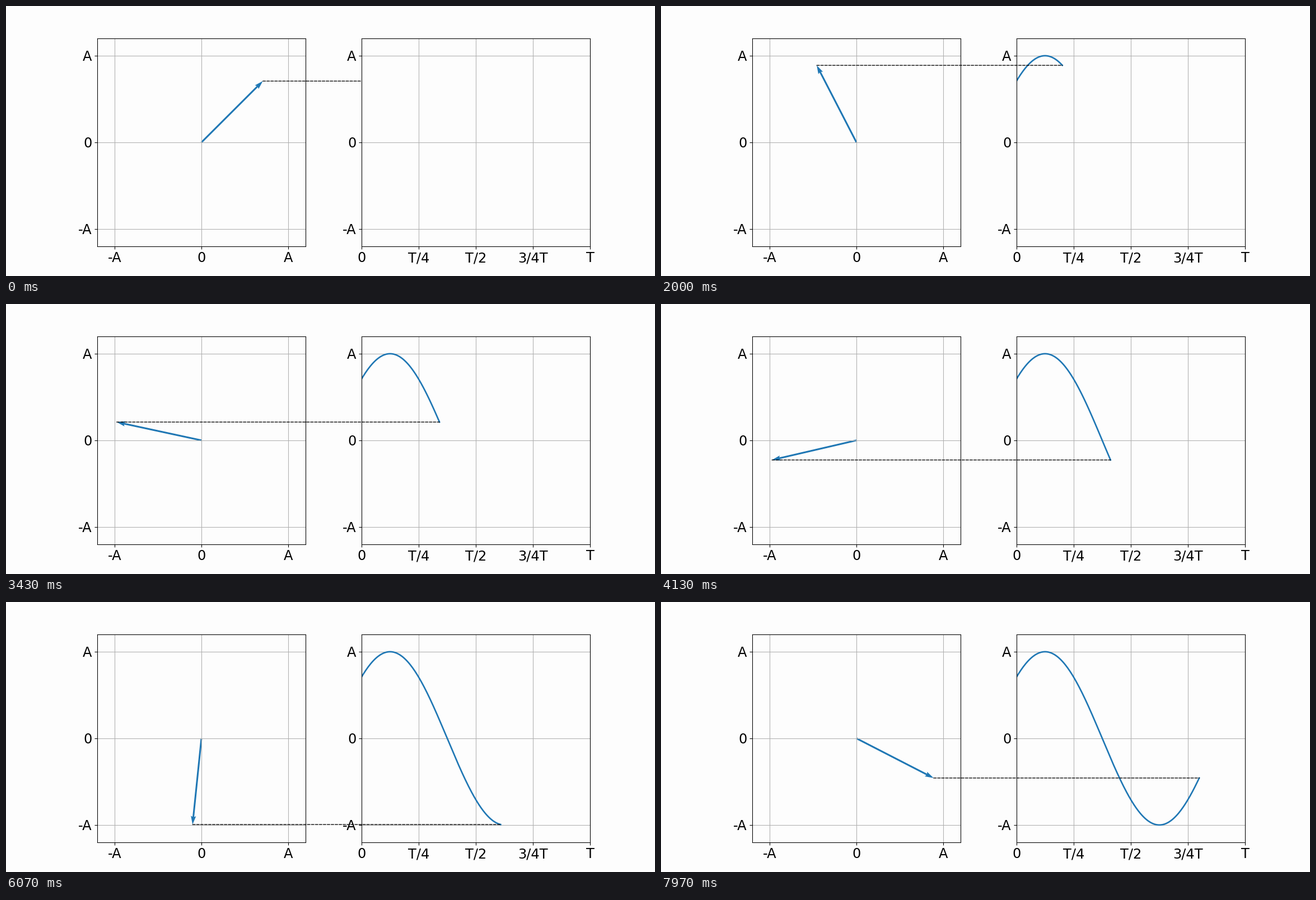
Animation, 1159 px wide and 483 px high, one loop 8000 ms. Source, as a matplotlib script:

```python
import numpy as np
import matplotlib.pyplot as plt
from matplotlib.animation import FuncAnimation
from matplotlib.patches import ConnectionPatch

W, H, DPI = 1159, 483, 96
FRAMES, LOOP_MS = 240, 8000
AMP, LIMIT = 4, 4.8
BLUE, PAPER = "#1f77b4", "#fdfdfd"

# One period; the loop covers only its first 240 samples
time = np.linspace(0, 1, 300)
angle = 2 * np.pi * time + np.pi / 4
x, y = AMP * np.cos(angle), AMP * np.sin(angle)

plt.rcParams["font.family"] = "DejaVu Sans"
fig, (phasor_ax, wave_ax) = plt.subplots(
    1, 2, figsize=(W / DPI, H / DPI), dpi=DPI, facecolor=PAPER)

amp_ticks, amp_labels = [-AMP, 0, AMP], ["-A", "0", "A"]
for ax in (phasor_ax, wave_ax):
    ax.set_facecolor(PAPER)
    ax.set_ylim(-LIMIT, LIMIT)
    ax.set_yticks(amp_ticks, amp_labels)
    ax.tick_params(labelsize=18.1)
    ax.grid(True)

phasor_ax.set_xlim(-LIMIT, LIMIT)
phasor_ax.set_xticks(amp_ticks, amp_labels)
phasor_ax.set_aspect("equal")
wave_ax.set_xlim(0, 1)
wave_ax.set_xticks(np.linspace(0, 1, 5), ["0", "T/4", "T/2", "3/4T", "T"])

arrow = phasor_ax.quiver(0, 0, x[0], y[0], color=BLUE, angles="xy",
                         scale_units="xy", scale=1, units="dots", width=3.06)
wave, = wave_ax.plot([], [], color=BLUE, lw=2)
link = ConnectionPatch((x[0], y[0]), (0, y[0]), "data", "data",
                       axesA=phasor_ax, axesB=wave_ax,
                       linestyle="--", lw=1, color="black")
fig.add_artist(link)


def update(i):
    arrow.set_UVC(x[i], y[i])
    wave.set_data(time[:i + 1], y[:i + 1])
    link.xy1 = x[i], y[i]
    link.xy2 = time[i], y[i]
    return arrow, wave, link


anim = FuncAnimation(fig, update, frames=FRAMES, interval=LOOP_MS / FRAMES,
                     repeat=True, repeat_delay=0)
plt.show()
```
